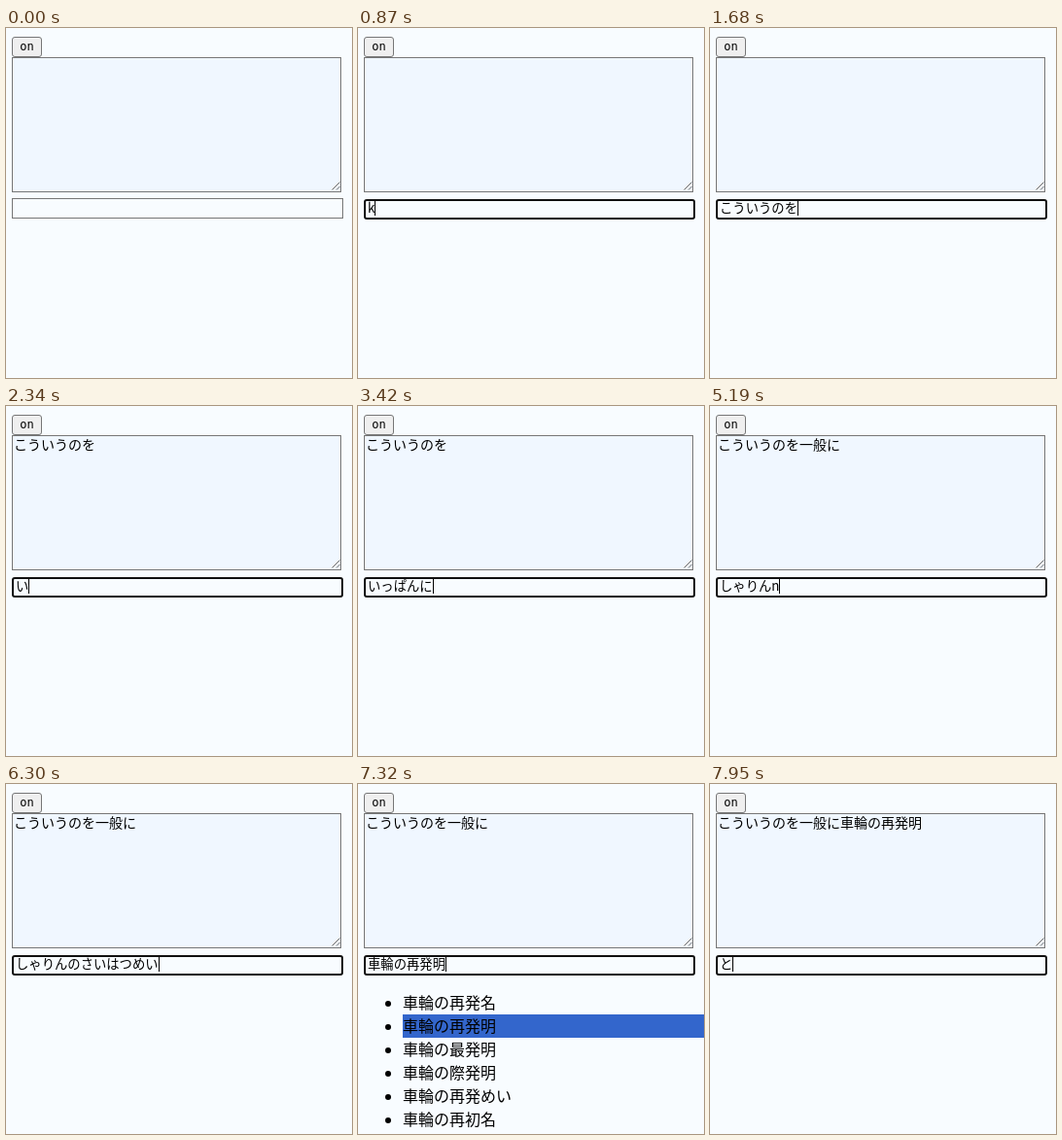
Write an HTML page that moves like this. It is 356 by 360 pixels and loops after 8000 ms.

```html
<!DOCTYPE html>
<html lang="ja">
<meta charset="utf-8">
<title>Kana input</title>
<style>
  html, body { margin: 0; width: 100%; height: 100%; overflow: hidden; background: #f8fcff; }
  body { position: relative; font-family: "Noto Sans CJK JP", "Noto Sans CJK", sans-serif; color: #000; }
  body > *, .line { position: absolute; box-sizing: border-box; }
  #btn { left: 6px; top: 9px; width: 31px; height: 21px; border: 1px solid #767676; border-radius: 3px;
    background: #efefef; font: 12px/19px "DejaVu Sans Mono", monospace; text-align: center; }
  .box { left: 6px; border: 1px solid #767676; }
  .box.focus { border: 2px solid #101010; border-radius: 3px; }
  #area { top: 30px; width: 339px; height: 139px; background: #f0f7ff; }
  #area.focus { top: 29px; height: 140px; }
  #field { top: 175px; width: 341px; height: 21px; }
  #field.focus { top: 176px; }
  .line { white-space: pre; line-height: 16px; height: 16px; }
  #areaText { left: 8px; top: 31px; font-size: 14px; }
  #fieldText { left: 10px; top: 177px; font-size: 13.333px; }
  .line i { position: absolute; left: 100%; top: 1px; width: 1px; height: 15px; background: #000; }
  #grip { left: 335px; top: 158px; }
  #list { left: 46px; top: 213px; width: 310px; margin: 0; padding: 0; list-style: none; font-size: 16px; }
  #list li { position: relative; height: 24px; line-height: 22px; white-space: pre; }
  #list li.on { background: #3366cc; }
  #list li::before { content: ""; position: absolute; left: -18px; top: 10px; width: 6px; height: 6px;
    border-radius: 50%; background: #000; }
</style>
<div id="btn">on</div>
<div id="area" class="box"></div>
<svg id="grip" width="9" height="9" stroke="#666" fill="none"><path d="M.5 8.5 8.5 .5M5 8.5 8.5 5"/></svg>
<div id="field" class="box"></div>
<div id="areaText" class="line"><span></span><i></i></div>
<div id="fieldText" class="line"><span></span><i></i></div>
<ul id="list"></ul>
<script>
const LOOP = 8000;
const $ = id => document.getElementById(id);
const first = 'こういうのを', second = first + '一般に', third = second + '車輪の再発明';
const general = '一般に 一半に 一斑に 一飯に 一班に 一版に'.split(' ');
const wheel = '車輪の再発名 車輪の再発明 車輪の最発明 車輪の際発明 車輪の再発めい 車輪の再初名'.split(' ');

const states = [];
let done = '';
const add = (time, state) => states.push({ time, area: done, field: '', focus: 'field', caret: true, words: [], pick: 0, ...state });

// One state per keystroke, evenly spaced from start to end.
function type(start, end, prefix, keys) {
  const steps = keys.split(' ');
  steps.forEach((s, i) => add(start + (end - start) * i / Math.max(1, steps.length - 1), { field: prefix + s }));
}
function commit(time, text) {
  done = text;
  add(time, { focus: 'area' });
}
function convert(time, words, pick, caret = true) {
  add(time, { field: words[pick], words, pick, caret });
}

add(0, { focus: '' });
commit(240, '');
type(750, 1680, '', ' k こ こう こうい こういう こういうn こういうの こういうのw こういうのを');
commit(1920, first);
type(2340, 2970, '', 'い いp いっp いっぱ いっぱn いっぱん');
type(3330, 3420, 'いっぱん', 'n に');
convert(3930, general, 0);
commit(4260, second);
type(4440, 5220, '', 's sy しゃ しゃr しゃり しゃりn しゃりん しゃりんn しゃりんの');
type(5310, 6300, 'しゃりんの', 's さ さい さいh さいは さいはt さいはつ さいはつm さいはつめ さいはつめい');
convert(6510, wheel, 0);
convert(6990, wheel, 0, false);
convert(7320, wheel, 1);
commit(7650, third);
type(7860, 7950, '', 't と');

function draw(s) {
  for (const id of ['area', 'field']) {
    const focused = s.focus === id, line = $(id + 'Text');
    $(id).classList.toggle('focus', focused);
    line.firstChild.textContent = s[id];
    line.lastChild.hidden = !(focused && s.caret);
    line.lastChild.style.display = focused && s.caret ? '' : 'none';
  }
  $('list').replaceChildren(...s.words.map((word, i) => {
    const li = document.createElement('li');
    li.textContent = word;
    li.classList.toggle('on', i === s.pick);
    return li;
  }));
}

const begin = performance.now();
let shown;
function tick() {
  const t = (performance.now() - begin) % LOOP;
  const state = states.findLast(s => s.time <= t) || states[0];
  if (state !== shown) draw(shown = state);
  requestAnimationFrame(tick);
}
tick();
</script>
</html>
```
